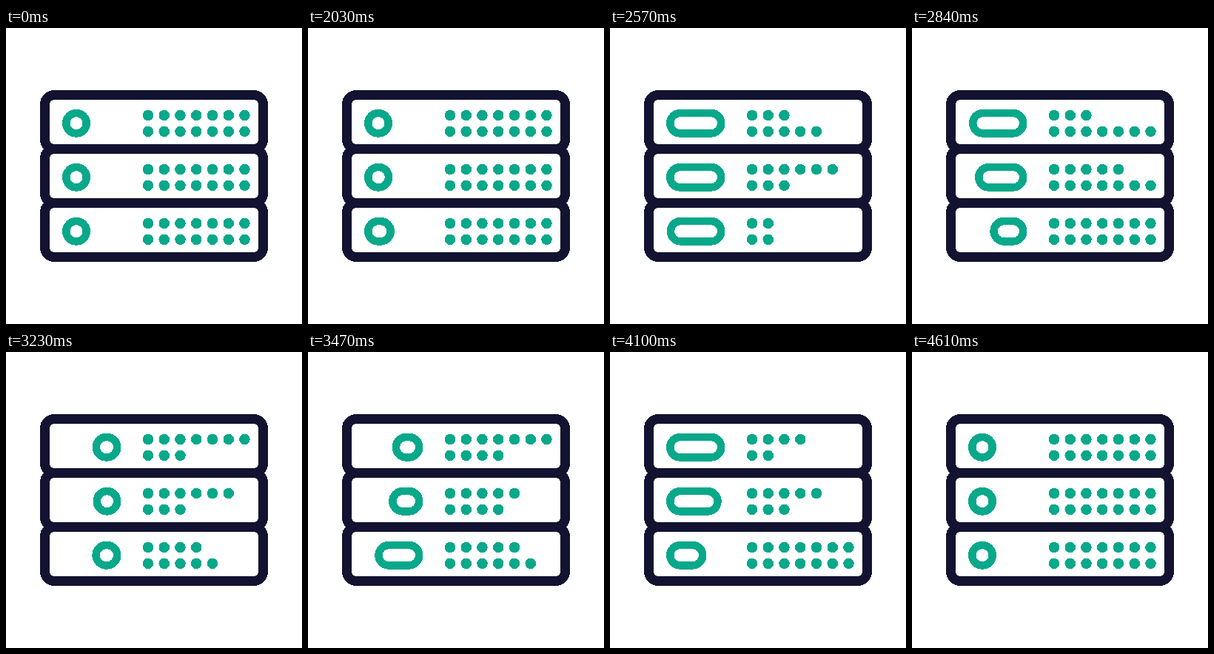
An HTML page for the animation above (4.64 s loop, 400 by 400 pixels).

```html
<!DOCTYPE html>
<html lang="en">
<head>
<meta charset="utf-8">
<title>Servers</title>
<style>
  html, body { margin: 0; width: 100%; height: 100%; overflow: hidden; background: #fff; }
  svg { display: block; width: 100vw; height: 100vh; shape-rendering: crispEdges; }
  .case { fill: none; stroke: #121331; stroke-width: 13; }
  .pill { fill: none; stroke: #08a88a; stroke-width: 10.5; }
  .dot { fill: #08a88a; }
</style>
</head>
<body>
<svg id="stage" viewBox="0 0 400 400"></svg>
<script>
const LOOP = 4640, START = 2030, END = 4610, STEP = 30;
const PITCH = 73, TRAVEL = 41.5, DOTS = 7;

// legs: when the right edge leaves, the left edge follows, returns, the right edge returns
// waves: how the upper and lower dot lines dip and refill
const rows = [
  {
    legs: [2104, 2797, 3380, 4130],
    waves: [{ dips: 2, depth: 4.9, drift: -2 }, { dips: 3, depth: 2, drift: 4.5 }]
  },
  {
    legs: [2009, 2697, 3333, 4000],
    waves: [{ dips: 4, depth: 1.6, drift: 5.9 }, { dips: 3, depth: 5, drift: -1 }]
  },
  {
    legs: [1964, 2535, 3182, 3830],
    waves: [{ dips: 3, depth: 8, drift: -10 }, { dips: 3, depth: 9.6, drift: -15.5 }]
  }
];

const stage = document.getElementById('stage');

function add(tag, attrs) {
  const el = document.createElementNS('http://www.w3.org/2000/svg', tag);
  for (const k in attrs) el.setAttribute(k, attrs[k]);
  return stage.appendChild(el);
}

rows.forEach((row, i) => {
  const y = i * PITCH;
  add('rect', { class: 'case', x: 52.5, y: 90.5 + y, width: 295, height: PITCH, rx: 12.5 });
  row.pill = add('rect', { class: 'pill', y: 114.95 + y, height: 27.5, rx: 13.75 });
  row.dots = [118, 139.8].map(cy => Array.from({ length: DOTS }, (_, n) =>
    add('circle', { class: 'dot', cx: 192 + 21.75 * n, cy: cy + y, r: 7.3 })));
});

function ease(t, start, span) {
  const u = Math.min(1, Math.max(0, (t - start) / span));
  return u * u * (3 - 2 * u);
}

function litDots({ dips, depth, drift }, u) {
  return Math.round(DOTS - (depth + drift * u) * Math.sin(Math.PI * dips * u) ** 2);
}

function draw(time) {
  const active = time >= START && time < END;
  const t = START + Math.floor((time - START) / STEP) * STEP;
  const u = active ? (t - START) / (END - START) : 0;
  for (const row of rows) {
    const [out, follow, back, home] = row.legs.map((s, i) => active ? ease(t, s, i ? 475 : 410) : 0);
    const left = TRAVEL * (follow - back), right = TRAVEL * (out - home);
    row.pill.setAttribute('x', 81.25 + left);
    row.pill.setAttribute('width', 27.5 + right - left);
    row.dots.forEach((line, i) => {
      const lit = litDots(row.waves[i], u);
      line.forEach((dot, n) => dot.setAttribute('visibility', n < lit ? 'visible' : 'hidden'));
    });
  }
}

const origin = performance.now();
function tick() {
  draw((performance.now() - origin) % LOOP);
  requestAnimationFrame(tick);
}
tick();
</script>
</body>
</html>
```
